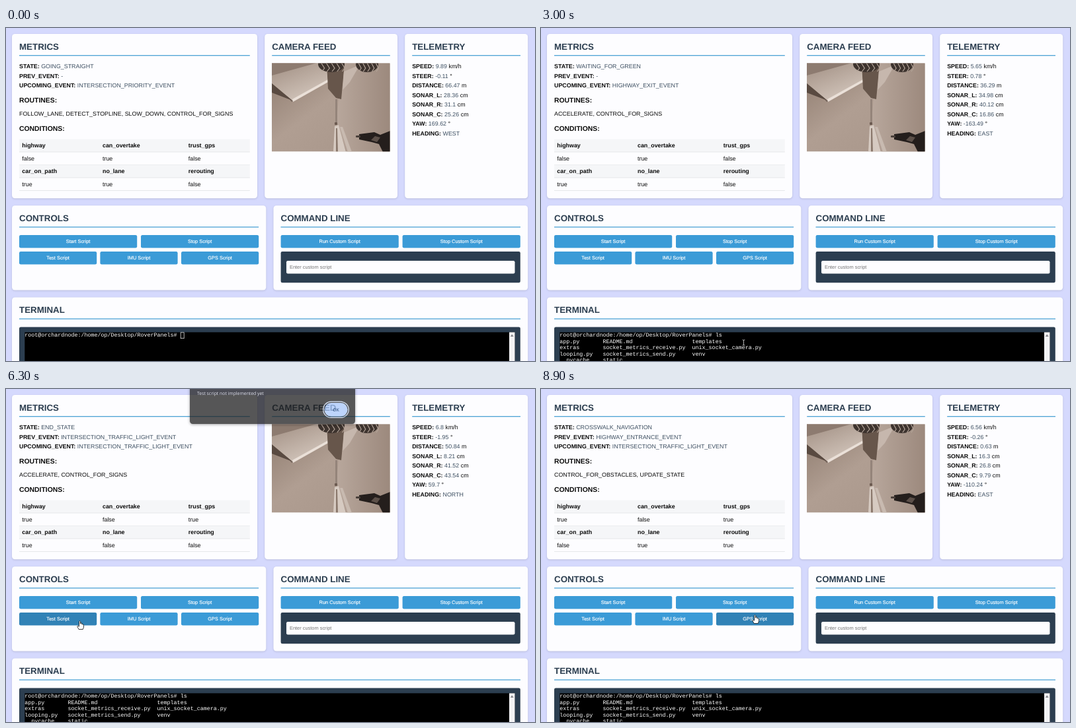
Write an HTML page that moves like this. It is 800 by 505 pixels and loops after 9 s.

```html
<!DOCTYPE html>
<html lang="en">
<head>
<meta charset="utf-8">
<title>Rover dashboard</title>
<style>
  html, body { margin: 0; width: 100%; height: 100%; overflow: hidden; background: #d5d9fd; }
  svg { display: block; width: 800px; height: 505px; }
  text { font: 8.9px "Liberation Sans", Arial, sans-serif; text-rendering: geometricPrecision; white-space: pre; fill: #0c0c0c; }
  .b { font-weight: 700; }
  .v { fill: #3d4f61; font-weight: 400; }
  .h2 { font-size: 13.34px; font-weight: 700; fill: #2c3e50; }
  .h3 { font-size: 10.4px; font-weight: 700; }
  .btn { font-size: 7.42px; fill: #fff; stroke: #fff; stroke-width: .16; text-anchor: middle; }
  .hint { font-size: 7.42px; fill: #757575; }
  .term { font: 8.35px "Liberation Mono", "Courier New", monospace; fill: #fff; }
  .note { font: 6.85px "Open Sans", "Noto Sans", sans-serif; fill: #e8e8e8; }
  .ok { font: 600 6.7px "Open Sans", "Noto Sans", sans-serif; fill: #0b3470; text-anchor: middle; }
  .card { fill: #fdfdff; filter: drop-shadow(0 1px 1.5px rgba(0,0,0,.13)); }
</style>
</head>
<body>
<svg id="stage" viewBox="0 0 800 505">
  <defs>
    <linearGradient id="wall" x1="0" y1="0" x2="1" y2="1">
      <stop offset="0" stop-color="#8d7a6d"/><stop offset=".45" stop-color="#b09e92"/>
      <stop offset=".75" stop-color="#ab998d"/><stop offset="1" stop-color="#8a776b"/>
    </linearGradient>
    <linearGradient id="panel" x1="0" y1="0" x2=".6" y2="1">
      <stop offset="0" stop-color="#a08e82"/><stop offset="1" stop-color="#d2c5bb"/>
    </linearGradient>
    <linearGradient id="side" x1="0" y1="0" x2="1" y2="0">
      <stop offset="0" stop-color="#b8a79c"/><stop offset="1" stop-color="#9c897d"/>
    </linearGradient>
    <clipPath id="lens"><rect x="402" y="53.5" width="178.5" height="133.7"/></clipPath>
  </defs>
</svg>
<script>
const NS = "http://www.w3.org/2000/svg";
const stage = document.getElementById("stage");

function add(tag, attrs, parent = stage) {
  const el = document.createElementNS(NS, tag);
  for (const k in attrs) el.setAttribute(k, attrs[k]);
  parent.appendChild(el);
  return el;
}
function text(x, y, str, cls = "", parent = stage) {
  const el = add("text", { x, y, class: cls }, parent);
  el.textContent = str;
  return el;
}
function rect(x, y, x2, y2, fill, rx = 0, parent = stage) {
  return add("rect", { x, y, width: x2 - x, height: y2 - y, fill, rx }, parent);
}
function poly(points, fill, parent) {
  return add("polygon", { points, fill }, parent);
}
function card(x, y, x2, y2, title) {
  rect(x, y, x2, y2, "#fdfdff", 4.5).setAttribute("class", "card");
  text(x + 11, y + 23.6, title, "h2");
  rect(x + 11, y + 32.1, x2 - 11.2, y + 33.3, "#3e9bd2");
}
// Label, changing value and unit on one line.
function field(x, y, label, unit = "") {
  const line = text(x, y, "");
  const span = (str, cls) => {
    const s = add("tspan", { class: cls }, line);
    s.textContent = str;
    return s;
  };
  span(label + ":", "b");
  span(" ", "");
  const value = span("", "v");
  span(unit && " " + unit, "");
  return value;
}

card(9, 9, 380, 258.2, "METRICS");
card(391.2, 9, 592, 258.2, "CAMERA FEED");
card(603.2, 9, 789.2, 258.2, "TELEMETRY");
card(9, 269.2, 393.3, 397.5, "CONTROLS");
card(404.5, 269.2, 789.2, 397.5, "COMMAND LINE");
card(9, 408.4, 789.2, 520, "TERMINAL");

// Metrics
const metrics = ["STATE", "PREV_EVENT", "UPCOMING_EVENT"].map((s, i) => field(20, 61.2 + i * 14.5, s));
text(20, 112.7, "ROUTINES:", "h3");
const routines = text(20, 133.2, "");
text(20, 155.7, "CONDITIONS:", "h3");
const flags = [];
const columns = [24.3, 146, 275.8];
[["highway", "can_overtake", "trust_gps"], ["car_on_path", "no_lane", "rerouting"]].forEach((names, r) => {
  const y = 168.6 + r * 39;
  rect(20, y, 368.8, y + 19.3, "#f5f6f8");
  rect(20, y + 19.1, 368.8, y + 19.7, "#d8dadd");
  rect(20, y + 38.6, 368.8, y + 39.2, "#d8dadd");
  names.forEach((name, c) => {
    text(columns[c], y + 12.6, name, "b");
    flags.push(text(columns[c], y + 32.1, ""));
  });
});

// Telemetry
const telemetry = ["SPEED km/h", "STEER °", "DISTANCE m", "SONAR_L cm", "SONAR_R cm", "SONAR_C cm", "YAW °", "HEADING"]
  .map((s, i) => field(614.2, 61.2 + i * 14.5, ...s.split(" ")));

// Camera view
const view = add("g", { "clip-path": "url(#lens)" });
rect(402, 53, 581, 188, "url(#wall)", 0, view);
poly("508,53 581,53 581,188 515,188 500,140", "url(#side)", view);
poly("402,76 432,112 440,108 402,64", "#75645a", view);
poly("402,53 485,53 487,80 433,110 402,84", "url(#panel)", view);
poly("402,53 470,53 402,72", "#8d7b70", view);
poly("433,108 487,78 487,82 434,112", "#eae0d8", view);
poly("485,53 512,53 507,108 499,106 487,92", "#67564b", view);
poly("511,66 535,56 520,82 509,94", "#c6b7ad", view);
poly("402,84 433,110 402,98", "#594a41", view);
const lamp = (cx, w) => {
  add("ellipse", { cx, cy: 55, rx: w, ry: 12, fill: "#3d332e" }, view);
  for (let i = -2; i < 3; i++)
    add("path", { d: `M${cx + i * w / 2.6} 53l${w / 4} 8l${-w / 5} 5`, stroke: "#b3a398", "stroke-width": 1.2, fill: "none" }, view);
};
lamp(492, 20);
lamp(546, 17);
rect(498, 108, 501, 146, "#94847a", 0, view);
rect(497, 143, 501, 147, "#6b5a50", 1, view);
poly("497,149 503,147 514,188 495,188", "#d6cac1", view);
poly("505,150 509,150 523,188 517,188", "#c8bab0", view);
poly("499,152 501,152 502,188 499,188", "#8b796d", view);
poly("534,161 557,158 566,162 581,156 581,188 570,188 564,176 553,173 534,169", "#241e1c", view);
rect(529, 163, 536, 166, "#4a403b", 1, view);
poly("558,164 566,166 561,173 552,170", "#5c5049", view);

// Buttons
const buttons = [
  [20, 314, 198.2, "Start Script"], [204, 314, 382.2, "Stop Script"],
  [20, 339, 137.2, "Test Script"], [142.4, 339, 259.6, "IMU Script"], [265, 339, 382.2, "GPS Script"],
  [415.6, 314, 593.8, "Run Custom Script"], [599.6, 314, 777.8, "Stop Custom Script"]
].map(([x, y, x2, label]) => {
  const box = rect(x, y, x2, y + 19.5, "#3b9bd7", 2.3);
  text((x + x2) / 2, y + 12.2, label, "btn");
  return { x, y, x2, y2: y + 19.5, box };
});
const TEST = buttons[2];

rect(415.6, 339, 777.8, 386.3, "#2c3e50", 2.3);
rect(424, 353, 769.5, 372.4, "#fdfdff", 2.2);
text(429, 365.3, "Enter custom script", "hint");

// Terminal
rect(20, 453.5, 777.8, 510, "#2c3e50", 2.3);
rect(28.3, 461.4, 769.5, 510, "#000");
rect(761, 461.4, 769.5, 510, "#f3f3f5");
poly("762.7,467.9 767.7,467.9 765.2,464.4", "#85858a");
const CHAR = 5.01;
const PROMPT = "root@orchardnode:/home/op/Desktop/RoverPanels# ";
const prompt = text(28.3, 468.4, "", "term");
const block = rect(0, 461.8, 5, 470.7, "#fff");
const listing = add("g", {});
[["app.py", "README.md", "templates"],
 ["extras", "socket_metrics_receive.py", "unix_socket_camera.py"],
 ["looping.py", "socket_metrics_send.py", "venv"],
 ["__pycache__", "static", ""]].forEach((row, r) => {
  const line = row[0].padEnd(13) + row[1].padEnd(27) + row[2];
  text(28.3, 477.9 + r * 9.45, line, "term", listing);
});

// Alert
const alertBox = add("g", {});
rect(278, -20, 528, 58, "#1f1f1f", 4.5, alertBox).style.filter = "drop-shadow(0 1px 2px rgba(0,0,0,.45))";
text(289, 14, "Test script not implemented yet", "note", alertBox);
add("rect", { x: 479.7, y: 24.2, width: 38.6, height: 24.2, rx: 12.1, fill: "#1f1f1f", stroke: "#d3e3fd", "stroke-width": 1.2 }, alertBox);
rect(481.4, 25.9, 516.6, 46.7, "#a8c7fa", 10.4, alertBox);
text(499, 38.8, "OK", "ok", alertBox);

// Pointers, each with its hot spot at 0,0
const pointers = {
  arrow: ["M0 0V10.2L2.4 8L4 11.6L5.6 10.9L4.1 7.4H7.2Z", "#fff", "#111"],
  hand: ["M-1 1Q0-.6 1 1V4.6Q2-.1+3 5Q4 4.4 4.6 5.6Q6 5 6 7V9.5L4.8 13H-1.4L-3.8 8.6Q-3.6 6.8-1 8.6Z", "#fff", "#111"],
  beam: ["M-1.8-4.2Q0-4.2 0-3V3Q0 4.2-1.8 4.2M1.8-4.2Q0-4.2 0-3M0 3Q0 4.2 1.8 4.2", "none", "#ddd"]
};
for (const k in pointers) {
  const [d, fill, stroke] = pointers[k];
  pointers[k] = add("path", { d, fill, stroke, "stroke-width": .8, "stroke-linejoin": "round" });
}

// time, state, previous event, next event, routines, conditions, telemetry
const LIGHT = "INTERSECTION_TRAFFIC_LIGHT_EVENT";
const LANE = "FOLLOW_LANE, DETECT_STOPLINE, SLOW_DOWN, CONTROL_FOR_SIGNS";
const OBSTACLES = "CONTROL_FOR_OBSTACLES, UPDATE_STATE";
const SIGNS = "ACCELERATE, CONTROL_FOR_SIGNS";
const readings = [
  [0, "GOING_STRAIGHT", "-", "INTERSECTION_PRIORITY_EVENT", LANE, "ftfttf", "9.89 -0.11 66.47 28.36 31.1 25.26 169.62 WEST"],
  [800, "LANE_FOLLOWING", LIGHT, "CROSSWALK_EVENT", OBSTACLES, "ftffft", "6.77 2.55 85.36 25.07 31.96 5.61 40.98 NORTH"],
  [2300, "WAITING_FOR_GREEN", "-", "HIGHWAY_EXIT_EVENT", SIGNS, "ftfttf", "5.65 0.78 36.29 34.98 40.12 16.86 -163.49 EAST"],
  [3800, "GOING_STRAIGHT", LIGHT, "HIGHWAY_ENTRANCE_EVENT", LANE, "tfttff", "6.21 4.65 51.61 33.17 4.2 4.31 -113.37 EAST"],
  [5300, "END_STATE", LIGHT, LIGHT, SIGNS, "tfttff", "6.8 -1.95 50.84 8.21 41.52 43.54 59.7 NORTH"],
  [8400, "CROSSWALK_NAVIGATION", "HIGHWAY_ENTRANCE_EVENT", LIGHT, OBSTACLES, "tftftt", "6.56 -0.26 0.63 16.3 26.8 9.79 -110.24 EAST"]
];

// time, x, y
const route = [
  [500, 784, 498], [1300, 306.5, 477], [3100, 306.5, 477], [3900, 655, 391], [4100, 655, 391],
  [4400, 116, 323.5], [5000, 116, 323.5], [5600, 111.5, 351.5], [6900, 111.5, 351.5],
  [7300, 634, 150], [7600, 499.5, 33], [8000, 499.5, 33], [8800, 323.5, 342.5], [9000, 323.5, 342.5]
];
// time, opacity, vertical shift
const alertSteps = [[0, 0, 0], [6200, .35, -8], [6300, .75, -5], [6400, .94, -1.5], [6500, 1, 0], [8000, .6, -2], [8100, .15, -5], [8200, 0, 0]];

const latest = (steps, t) => steps.findLast(s => s[0] <= t);

function mouseAt(t) {
  const i = Math.max(1, route.findIndex(p => p[0] > t));
  const [t0, x0, y0] = route[i - 1], [t1, x1, y1] = route[i];
  const k = (1 - Math.cos(Math.PI * (t - t0) / (t1 - t0))) / 2;
  return { x: x0 + (x1 - x0) * k, y: y0 + (y1 - y0) * k };
}

let shown;
function showReading(r) {
  if (r === shown) return;
  shown = r;
  metrics.forEach((el, i) => el.textContent = r[i + 1]);
  routines.textContent = r[4];
  flags.forEach((el, i) => el.textContent = r[5][i] === "t" ? "true" : "false");
  r[6].split(" ").forEach((v, i) => telemetry[i].textContent = v);
}

function showTerminal(t) {
  const typed = "ls".slice(0, t < 1500 ? 0 : t < 1600 ? 1 : 2);
  const focused = t >= 1400;
  prompt.textContent = PROMPT + typed;
  block.setAttribute("x", 28.3 + CHAR * (PROMPT.length + typed.length) + (focused ? 0 : .4));
  block.setAttribute("fill", focused ? "#fff" : "none");
  block.setAttribute("stroke", focused ? "none" : "#fff");
  block.setAttribute("stroke-width", .7);
  block.style.display = t < 2200 ? "" : "none";
  listing.style.display = t >= 2200 ? "" : "none";
}

function showMouse(t) {
  const { x, y } = mouseAt(t);
  const inside = b => x >= b.x && x <= b.x2 && y >= b.y && y <= b.y2;
  const modal = t >= 6200 && t < 8200;
  const visible = t >= 500;
  const over = !visible ? null : modal ? TEST : buttons.find(inside);
  buttons.forEach(b => b.box.setAttribute("fill", b === over ? "#3182b6" : "#3b9bd7"));
  const inTerm = x > 28 && x < 761 && y > 461;
  const inInput = x > 424 && x < 769 && y > 353 && y < 372;
  let kind = "arrow";
  if (over && inside(over)) kind = "hand";
  else if (!modal && (inTerm || inInput)) kind = "beam";
  for (const k in pointers) {
    pointers[k].style.display = visible && k === kind ? "" : "none";
    pointers[k].setAttribute("transform", `translate(${x} ${y})`);
  }
  pointers.beam.setAttribute("stroke", inTerm ? "#ddd" : "#222");
}

function draw(t) {
  showReading(latest(readings, t));
  showTerminal(t);
  const [, opacity, dy] = latest(alertSteps, t);
  alertBox.setAttribute("opacity", opacity);
  alertBox.setAttribute("transform", `translate(0 ${dy})`);
  showMouse(t);
}

const start = performance.now();
function tick() {
  const t = (performance.now() - start) % 9000;
  draw(Math.floor(t / 100) * 100);
  requestAnimationFrame(tick);
}
tick();
</script>
</body>
</html>
```
